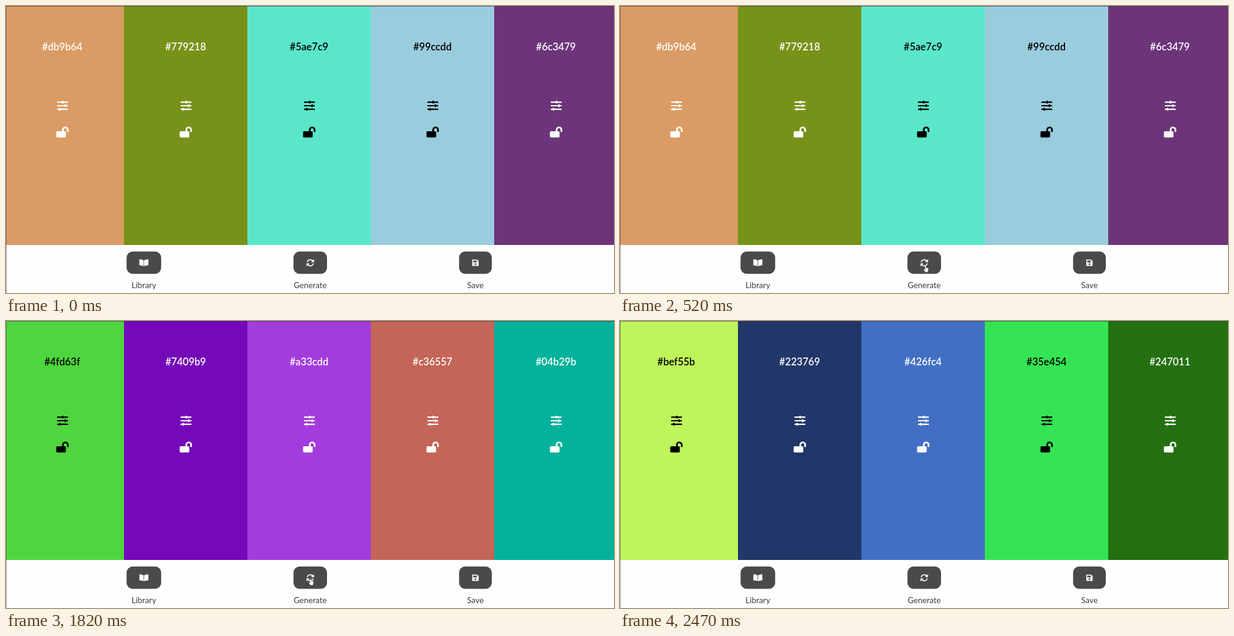
Animation of 1000 by 472 pixels, one loop 2860 ms. Source, as an HTML page with a canvas:

```html
<!DOCTYPE html>
<html lang="en">
<head>
<meta charset="utf-8">
<title>Palette generator</title>
<style>
html, body { margin: 0; width: 100%; height: 100%; overflow: hidden; background: #fefefe; }
canvas { display: block; }
</style>
</head>
<body>
<canvas id="stage" width="1000" height="472"></canvas>
<script>
const ctx = document.getElementById('stage').getContext('2d');
const LOOP = 2860, STEP = 130;
const EDGES = [0, 194, 397, 600, 803, 1000];
const BUTTON = '#4a4a4a';
const PALETTES = [
  { at: 0, colors: ['#db9b64', '#779218', '#5ae7c9', '#99ccdd', '#6c3479'] },
  { at: 1170, colors: ['#413dac', '#b389ad', '#095170', '#30299b', '#cd7fa2'] },
  { at: 1820, colors: ['#4fd63f', '#7409b9', '#a33cdd', '#c36557', '#04b29b'] },
  { at: 2080, colors: ['#bef55b', '#223769', '#426fc4', '#35e454', '#247011'] }
];

function rect(x, y, w, h, color) {
  ctx.fillStyle = color;
  ctx.fillRect(x, y, w, h);
}

function round(x, y, w, h, r, color) {
  ctx.fillStyle = color;
  ctx.beginPath();
  ctx.roundRect(x, y, w, h, r);
  ctx.fill();
}

function label(text, x, y, font, color) {
  ctx.font = font + ' Lato, "Open Sans", sans-serif';
  ctx.textAlign = 'center';
  ctx.fillStyle = color;
  ctx.fillText(text, x, y);
}

// Relative luminance decides between black and white text.
function inkFor(hex) {
  const [r, g, b] = [1, 3, 5].map(i => (parseInt(hex.slice(i, i + 2), 16) / 255) ** 2.2);
  return 0.2126 * r + 0.7152 * g + 0.0722 * b > 0.45 ? '#000' : '#fff';
}

function sliders(cx, cy, color) {
  [0.5, 4.5, -4.5].forEach((knob, i) => {
    const y = cy + (i - 1) * 5.9;
    round(cx - 9, y - 1.1, 18, 2.2, 0.6, color);
    round(cx + knob - 1.2, y - 2.4, 2.4, 4.8, 0.8, color);
  });
}

function openLock(x, y, color) {
  round(x, y + 7.9, 15.8, 10.1, 1.7, color);
  ctx.strokeStyle = color;
  ctx.lineWidth = 2.8;
  ctx.lineCap = 'butt';
  ctx.beginPath();
  ctx.moveTo(x + 11, y + 8.5);
  ctx.arc(x + 14.95, y + 5.35, 3.95, Math.PI, 0);
  ctx.lineTo(x + 18.9, y + 8.2);
  ctx.stroke();
  round(x + 17.5, y + 7, 2.8, 2.1, 0.8, color);
}

function bookIcon(cx, cy) {
  ctx.fillStyle = '#fff';
  for (const side of [-1, 1]) {
    ctx.save();
    ctx.translate(cx, cy);
    ctx.scale(side, 1);
    ctx.beginPath();
    ctx.moveTo(0.4, -4.1);
    ctx.quadraticCurveTo(3, -5.6, 6.8, -5.7);
    ctx.quadraticCurveTo(7.4, -5.7, 7.4, -5);
    ctx.lineTo(7.4, 3.6);
    ctx.quadraticCurveTo(7.4, 4.2, 6.8, 4.2);
    ctx.quadraticCurveTo(3, 4.4, 0.4, 5.8);
    ctx.fill();
    ctx.restore();
  }
}

function syncIcon(cx, cy) {
  ctx.fillStyle = ctx.strokeStyle = '#fff';
  ctx.lineWidth = 1.8;
  for (const turn of [0, Math.PI]) {
    ctx.save();
    ctx.translate(cx, cy);
    ctx.rotate(turn);
    ctx.beginPath();
    ctx.arc(0, 0, 5, 1.07 * Math.PI, 1.8 * Math.PI);
    ctx.stroke();
    ctx.beginPath();
    ctx.moveTo(6.2, -6);
    ctx.lineTo(6.2, -1);
    ctx.lineTo(1.2, -1);
    ctx.fill();
    ctx.restore();
  }
}

function saveIcon(cx, cy) {
  ctx.fillStyle = '#fff';
  ctx.beginPath();
  ctx.moveTo(cx - 5.2, cy - 5.2);
  ctx.lineTo(cx + 2.7, cy - 5.2);
  ctx.lineTo(cx + 5.2, cy - 2.7);
  ctx.lineTo(cx + 5.2, cy + 5.2);
  ctx.lineTo(cx - 5.2, cy + 5.2);
  ctx.fill();
  rect(cx - 3.7, cy - 3.7, 6, 3, BUTTON);
  ctx.beginPath();
  ctx.arc(cx, cy + 2.2, 1.5, 0, 7);
  ctx.fill();
}

function hand(x, y) {
  ctx.save();
  ctx.translate(x, y);
  ctx.beginPath();
  ctx.moveTo(-1.9, -5);
  ctx.quadraticCurveTo(-1, -6.4, -0.1, -5);
  ctx.lineTo(-0.1, -1.9);
  ctx.lineTo(3, -1.2);
  ctx.quadraticCurveTo(4, -0.8, 3.9, 0.4);
  ctx.lineTo(3.2, 3.6);
  ctx.lineTo(2.8, 5.6);
  ctx.lineTo(-1.3, 5.6);
  ctx.lineTo(-3.9, 1.8);
  ctx.quadraticCurveTo(-3.9, 0.2, -1.9, 1);
  ctx.closePath();
  ctx.fillStyle = '#fff';
  ctx.fill();
  ctx.strokeStyle = 'rgba(70,55,70,.45)';
  ctx.lineWidth = 0.8;
  ctx.stroke();
  ctx.restore();
}

function cursor(t) {
  if (t < 260 || t >= 2470) return;
  const enter = Math.max(0, 1 - (t - 260) / 390);
  const leave = Math.max(0, (t - 2080) / 390);
  const away = enter ** 2 + leave ** 2;
  hand(502 + 13.5 * away, 429 + 29 * away);
}

function button(x, w, text, icon) {
  round(x, 403.7, w, 36.8, 10, BUTTON);
  icon(x + w / 2, 422.3);
  label(text, x + w / 2, 464, '13.3px', '#3c3c3c');
}

function draw(now) {
  const t = Math.floor((now % LOOP) / STEP) * STEP;
  rect(0, 0, 1000, 472, '#fefefe');
  const { colors } = PALETTES.filter(p => p.at <= t).pop();
  colors.forEach((color, i) => {
    rect(EDGES[i], 0, EDGES[i + 1] - EDGES[i], 393, color);
    const cx = 92.5 + 203 * i, ink = inkFor(color);
    label(color, cx, 73, '600 16.5px', ink);
    sliders(cx + 0.5, 164, ink);
    openLock(cx - 9.9, 198.2, ink);
  });
  button(198.3, 56.9, 'Library', bookIcon);
  button(472.8, 55.2, 'Generate', syncIcon);
  button(745.2, 53.8, 'Save', saveIcon);
  rect(0, 0, 1000, 1, 'rgba(50,50,50,.6)');
  rect(0, 1, 1, 471, 'rgba(50,50,50,.5)');
  cursor(t);
}

const start = performance.now();
function tick() {
  draw(performance.now() - start);
  requestAnimationFrame(tick);
}
tick();
</script>
</body>
</html>
```
